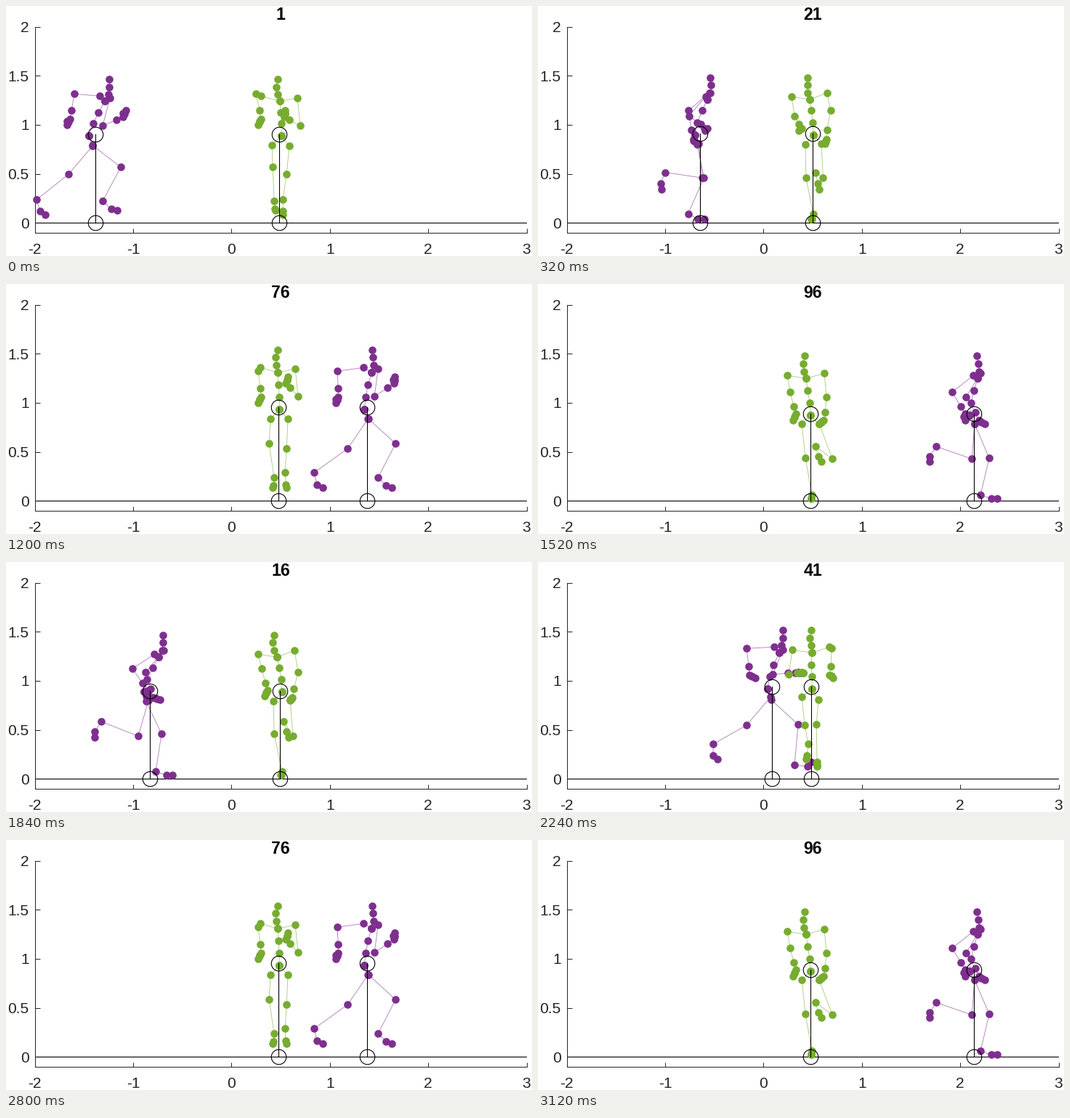
A matplotlib script that plays this animation: 724 px wide and 345 px high, repeating every 3200 ms.

```python
import matplotlib.pyplot as plt
import numpy as np
from matplotlib.animation import FuncAnimation

PURPLE, GREEN, INK = "#7e2f8e", "#77ac30", "#262626"
W, H, DPI = 724, 345, 100
UNIT = 135.4              # pixels per metre
FRAMES, CYCLE, STEP = 40, 20, 5
PX = 72 / DPI             # one pixel in points

# Key poses: joints as (forward, lateral, height) in pixels around the body.
# Trunk: centre of mass, root ... head.  Arm: shoulder, elbow, wrist, knuckle,
# fingertip.  Leg: hip, knee, ankle, ball, toe.
REACH = dict(
    trunk=[(0, 0, 122.5), (-9, 3, 120), (-3, 3, 137), (4, 2, 152),
           (13, 1, 168), (18, -2, 177), (19, -4, 187), (19, -2, 198)],
    arm_l=[(6, -25, 175), (-29, -32, 178), (-33, -27, 155), (-35, -25, 143), (-39, -29, 135)],
    arm_r=[(20, 25, 172), (10, 29, 134), (29, 14, 142), (38, 7, 146), (42, 8, 155)],
    leg_l=[(-4, -10, 107), (35, -9, 77), (10, -7, 30), (22, -6, 19), (30, -5, 17)],
    leg_r=[(-4, 14, 106), (-37, 10, 67), (-81, 5, 32), (-76, 5, 16), (-69, 5, 11)])
STANCE = dict(
    trunk=[(0, 1, 121), (-8, 4, 120), (-4, 3, 137), (4, 0, 153),
           (12, -3, 168), (17, -7, 177), (18, -9, 188), (18, -7, 198)],
    arm_l=[(6, -29, 172), (-24, -24, 152), (-10, -19, 132), (-2, -16, 122), (-5, -20, 114)],
    arm_r=[(19, 21, 177), (-6, 26, 147), (1, 20, 124), (5, 18, 112), (14, 15, 109)],
    leg_l=[(-5, -8, 107), (16, -7, 62), (8, 4, 10), (23, 3, 5), (31, 2, 5)],
    leg_r=[(-2, 15, 108), (-16, 19, 59), (-67, 6, 79), (-76, 10, 65), (-76, 13, 57)])
FLIGHT = dict(
    trunk=[(0, 0, 127), (-6, 1, 124), (-3, 1, 141), (2, 0, 157),
           (10, 1, 174), (13, 0, 184), (15, -2, 194), (15, 0, 205)],
    arm_l=[(15, -26, 178), (1, -31, 144), (22, -19, 146), (32, -15, 146), (43, -11, 146)],
    arm_r=[(3, 25, 182), (-35, 28, 180), (-32, 27, 155), (-31, 25, 143), (-23, 30, 139)],
    leg_l=[(-2, -13, 113), (-35, -9, 74), (-81, -4, 48), (-81, -6, 32), (-75, -7, 27)],
    leg_r=[(-1, 10, 109), (36, 7, 75), (31, 8, 19), (49, 8, 17), (54, 8, 23)])
APEX = dict(
    trunk=[(0, -1.5, 129), (-4, 0, 126), (-2, 0, 143), (1, -1, 160),
           (6, -2, 177), (9, -4, 187), (8, -5, 198), (7, -2, 208)],
    arm_l=[(-5, -26, 184), (-41, -29, 179), (-40, -26, 155), (-40, -25, 143), (-43, -29, 135)],
    arm_r=[(15, 22, 182), (10, 26, 144), (28, 15, 156), (37, 9, 162), (38, 12, 171)],
    leg_l=[(2, -12, 113), (39, -14, 79), (15, -7, 32), (26, -8, 21), (34, -9, 18)],
    leg_r=[(1, 12, 113), (-27, 10, 72), (-73, 8, 39), (-69, 9, 22), (-61, 10, 18)])
FINISH = dict(
    trunk=[(0, -1, 120), (-6, -1, 118), (-4, -2, 135), (0, -5, 152),
           (5, -7, 169), (7, -10, 178), (6, -11, 189), (4, -9, 200)],
    arm_l=[(-1, -33, 173), (-30, -29, 150), (-18, -24, 130), (-12, -21, 120), (-12, -25, 111)],
    arm_r=[(9, 18, 176), (-11, 21, 143), (2, 19, 122), (7, 17, 111), (15, 11, 106)],
    leg_l=[(1, -13, 106), (21, -8, 59), (9, 1, 8), (24, 0, 3), (32, 0, 3)],
    leg_r=[(1, 11, 106), (-3, 29, 58), (-52, 6, 75), (-61, 10, 61), (-61, 14, 54)])
PLANT = dict(
    leg_l=[(-4, -9, 106), (25, -8, 64), (33, 1, 13), (48, 1, 7), (56, 1, 6)],
    leg_r=[(-3, 14, 106), (-28, 14, 59), (-83, 6, 61), (-89, 8, 46), (-85, 9, 39)])
DRIVE = dict(
    leg_l=[(-1, -12, 110), (22, -12, 67), (-28, -6, 51), (-27, -7, 34), (-24, -8, 27)])


def mirrored(pose):
    """Swap the body sides, half a stride later."""
    swap = {"_l": "_r", "_r": "_l"}
    return {name[:-2] + swap.get(name[-2:], name[-2:]): np.multiply(part, (1, -1, 1))
            for name, part in pose.items()}


KEYS = {0: REACH, 2: PLANT, 3: STANCE, 5: mirrored(DRIVE), 7: mirrored(APEX),
        8: FLIGHT, 10: mirrored(PLANT), 11: mirrored(STANCE), 13: DRIVE,
        15: APEX, 18: PLANT, 19: FINISH}


def spline(times, values, t):
    """Cubic Hermite curve with parabolic tangents."""
    times, values = np.array(times, float), np.array(values, float)
    gap = np.diff(times)[:, None, None]
    rate = np.diff(values, axis=0) / gap
    inner = (rate[:-1] * gap[1:] + rate[1:] * gap[:-1]) / (gap[1:] + gap[:-1])
    slope = np.concatenate([rate[:1], inner, rate[-1:]])
    i = min(np.searchsorted(times, t, side="right") - 1, len(times) - 2)
    h = times[i + 1] - times[i]
    s = (t - times[i]) / h
    return ((1 + 2 * s) * (1 - s) ** 2 * values[i] + s * (1 - s) ** 2 * h * slope[i]
            + s * s * (3 - 2 * s) * values[i + 1] - s * s * (1 - s) * h * slope[i + 1])


def limb(name, t):
    times = [k for k in KEYS if name in KEYS[k]]
    return spline(times, [KEYS[k][name] for k in times], t)


def skeleton(t):
    """Centre of mass and the joint chains of the runner."""
    trunk = limb("trunk", t)
    com, spine = trunk[0], trunk[1:]
    chains = [spine]
    for side in "lr":
        arm = limb("arm_" + side, t)
        mid = (arm[3] + arm[4]) / 2
        thumb = mid + (-2, 0, 1)
        chains.append(np.vstack([spine[3], arm[:4], mid, arm[4], thumb]))
        chains.append(np.vstack([spine[0], limb("leg_" + side, t)]))
    return com, chains


class Runner:
    def __init__(self, ax, color, axis, z):
        self.axis = axis
        opts = dict(clip_on=False)
        self.bones, = ax.plot([], [], color=color, lw=0.9 * PX, alpha=0.6, zorder=z, **opts)
        self.dots, = ax.plot([], [], "o", color=color, ms=10.6 * PX, mew=0, zorder=z + 1, **opts)
        self.stick, = ax.plot([], [], "-o", color="black", lw=1.1 * PX, ms=20.5 * PX,
                              mfc="none", mew=1.1 * PX, zorder=z + 2, **opts)

    def place(self, com, chains, x0):
        gap = np.full((1, 3), np.nan)
        joints = np.vstack([np.vstack([c, gap]) for c in chains]) / UNIT
        x, y = x0 + joints[:, self.axis], joints[:, 2]
        self.bones.set_data(x, y)
        self.dots.set_data(x, y)
        cx = x0 + com[self.axis] / UNIT
        self.stick.set_data([cx, cx], [0, com[2] / UNIT])


fig = plt.figure(figsize=(W / DPI, H / DPI), dpi=DPI, facecolor="white")
left, right, top, bottom = 39.5, 716.5, 28.5, 312.8
ax = fig.add_axes([left / W, 1 - bottom / H, (right - left) / W, (bottom - top) / H])
ax.set(xlim=(-2, 3), ylim=(-0.1, 2))
ax.set_xticks(range(-2, 4), [str(v) for v in range(-2, 4)])
ax.set_yticks([0, 0.5, 1, 1.5, 2], ["0", "0.5", "1", "1.5", "2"])
ax.spines[["top", "right"]].set_visible(False)
for edge in ("left", "bottom"):
    ax.spines[edge].set(color=INK, linewidth=PX)
ax.tick_params(direction="in", length=6.5 * PX, width=PX, color=INK,
               labelcolor=INK, labelsize=21 * PX, labelfontfamily="Liberation Sans")
ax.tick_params(axis="x", pad=14 * PX)
ax.tick_params(axis="y", pad=8 * PX)
ax.plot([-2, 3], [0, 0], color="black", lw=1.1 * PX, zorder=2)
title = fig.text(378 / W, 1 - 19 / H, "", ha="center", va="baseline", color="black",
                 family="Liberation Sans", weight="bold", size=23 * PX)

side_view = Runner(ax, PURPLE, 0, 3)
front_view = Runner(ax, GREEN, 1, 6)


def draw(frame):
    t = frame % CYCLE
    com, chains = skeleton(t)
    run = np.interp(t, [0, 3, 8, 15, 19], [-1.383, -0.829, 0.087, 1.380, 2.140])
    side_view.place(com, chains, run)
    front_view.place(com, chains, 0.486)
    title.set_text(str(STEP * t + 1))
    return []


anim = FuncAnimation(fig, draw, frames=FRAMES, interval=80, repeat=True,
                     repeat_delay=0, blit=False)
plt.show()
```
